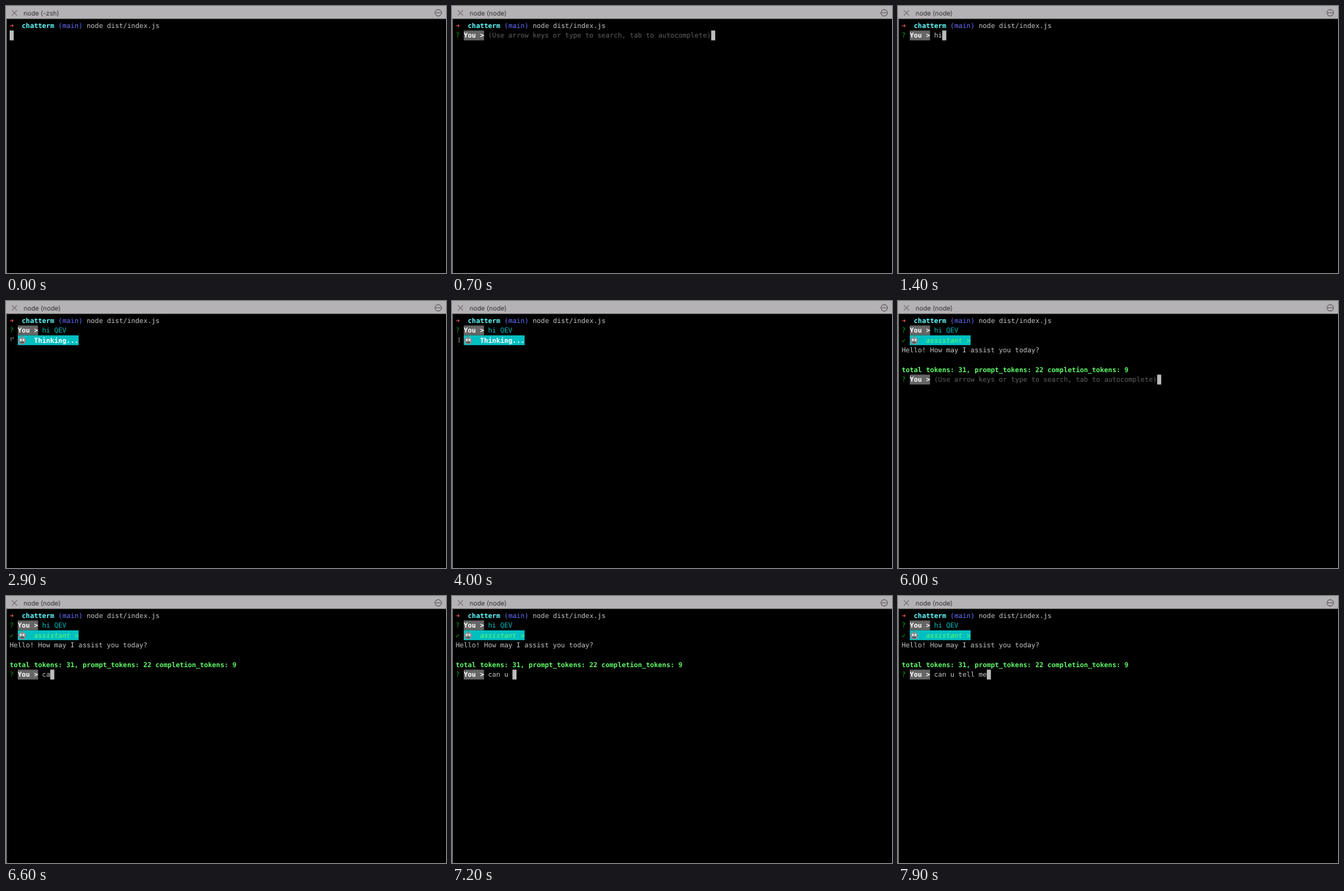
An HTML page with a canvas for the animation above (8000 ms loop, 600 by 364 pixels).

```html
<!DOCTYPE html>
<html lang="en">
<head>
<meta charset="utf-8">
<title>Terminal chat</title>
<style>
html, body { margin: 0; height: 100%; overflow: hidden; background: #000; }
canvas { display: block; width: 600px; height: 364px; }
</style>
</head>
<body>
<canvas></canvas>
<script>
const LOOP = 8000, COL = 5.53, ROW = 13.4, LEFT = 5, TOP = 20;
const MONO = '9.186px "DejaVu Sans Mono", monospace';
const FG = '#c3c3c3', GREEN = '#0ea80e', LIME = '#5ffa68', CYAN = '#00bfc1', GREY = '#666';
const HINT = '(Use arrow keys or type to search, tab to autocomplete)';
const SPINNER = '⠋⠙⠹⠸⠼⠴⠦⠧⠇⠏';

// Events in ms
const PROMPT = 200, TITLE = 700, SUBMIT = 2900, REPLY = 4400;
const FIRST = { text: 'hi QEV', keys: [1000, 1100, 1900, 2000, 2100, 2200] };
const SECOND = {
  text: 'can u tell me',
  keys: [6500, 6600, 6700, 6900, 7000, 7200, 7300, 7400, 7500, 7600, 7700, 7800, 7900]
};

const canvas = document.querySelector('canvas');
const ctx = canvas.getContext('2d');
const dpr = window.devicePixelRatio || 1;
canvas.width = 600 * dpr;
canvas.height = 364 * dpr;
ctx.scale(dpr, dpr);
ctx.textRendering = 'geometricPrecision';

const colX = col => LEFT + col * COL;
const rowY = row => TOP + row * ROW;

function write(row, col, text, color = FG, style = '') {
  ctx.font = style + ' ' + MONO;
  ctx.fillStyle = color;
  ctx.fillText(text, colX(col), rowY(row) + 10);
}

function cells(row, col, count, color) {
  ctx.fillStyle = color;
  ctx.fillRect(colX(col), rowY(row), count * COL, ROW);
}

function box(x, y, w, h, r, color) {
  ctx.fillStyle = color;
  ctx.beginPath();
  ctx.roundRect(x, y, w, h, r);
  ctx.fill();
}

function dot(x, y, r, color) {
  ctx.fillStyle = color;
  ctx.beginPath();
  ctx.arc(x, y, r, 0, 7);
  ctx.fill();
}

function cursor(row, col) {
  cells(row, col, 1, '#bdbdbd');
}

function titleBar(text) {
  ctx.fillStyle = '#b4b2b4';
  ctx.fillRect(0, 0, 600, 17.5);
  ctx.fillStyle = '#8c8c8c';
  ctx.fillRect(0, 17.5, 1, 347);

  ctx.strokeStyle = '#757375';
  ctx.lineWidth = 1.1;
  ctx.beginPath();
  ctx.moveTo(8, 5.8);
  ctx.lineTo(15, 12.8);
  ctx.moveTo(15, 5.8);
  ctx.lineTo(8, 12.8);
  ctx.stroke();

  ctx.font = '8.75px Inter, sans-serif';
  ctx.fillStyle = '#333233';
  ctx.fillText(text, 24, 12.6);

  ctx.strokeStyle = '#454445';
  ctx.lineWidth = 0.9;
  ctx.beginPath();
  ctx.arc(589.4, 9.3, 4.4, 0, 7);
  ctx.stroke();
  for (const dx of [-2.1, 0, 2.1]) dot(589.4 + dx, 9.3, 0.75, '#454445');
}

function robot(row) {
  const x = colX(2), y = rowY(row);
  dot(x + 6, y + 2.2, 1.1, '#c65a50');
  box(x + 0.8, y + 5.2, 10.4, 3.4, 1, '#b5605a');
  box(x + 1.7, y + 2.9, 8.6, 9.3, 2.5, '#8f979b');
  dot(x + 4.1, y + 6.2, 1.2, '#eef4f4');
  dot(x + 7.9, y + 6.2, 1.2, '#eef4f4');
  box(x + 3.4, y + 9, 5.2, 1.7, 0.5, '#3c4446');
}

function question(row, { text, keys }, t, done) {
  const typed = text.slice(0, keys.filter(k => t >= k).length);
  write(row, 0, '?', GREEN);
  cells(row, 2, 5, GREY);
  write(row, 2, 'You >', '#fff', 'bold');
  if (done) return write(row, 8, typed, CYAN);
  if (typed) write(row, 8, typed);
  else write(row, 8, HINT, '#606060');
  cursor(row, 8 + (typed || HINT).length);
}

function answer(row, t) {
  const done = t >= REPLY;
  cells(row, 2, 15, CYAN);
  robot(row);
  if (done) {
    write(row, 0, '✓', GREEN);
    write(row, 6, 'assistant >', LIME, 'italic');
    write(row + 1, 0, 'Hello! How may I assist you today?');
    write(row + 3, 0, 'total tokens: 31, prompt_tokens: 22 completion_tokens: 9', LIME, 'bold');
  } else {
    const step = Math.floor((t - SUBMIT) / 80);
    write(row, 0, SPINNER[step % SPINNER.length]);
    write(row, 6, 'Thinking...', '#fff', 'bold');
  }
}

function draw(t) {
  ctx.fillStyle = '#000';
  ctx.fillRect(0, 0, 600, 364);
  titleBar(t < TITLE ? 'node (-zsh)' : 'node (node)');

  write(0, 0, '➜', '#ff6059', 'bold');
  write(0, 3, 'chatterm', '#60fdff', 'bold');
  write(0, 12, '(main)', '#6871ff');
  write(0, 19, 'node dist/index.js');

  if (t < PROMPT) cursor(1, 0);
  else question(1, FIRST, t, t >= SUBMIT);
  if (t >= SUBMIT) answer(2, t);
  if (t >= REPLY) question(6, SECOND, t, false);
}

const start = performance.now();
function frame() {
  draw((performance.now() - start) % LOOP);
  requestAnimationFrame(frame);
}
frame();
</script>
</body>
</html>
```
